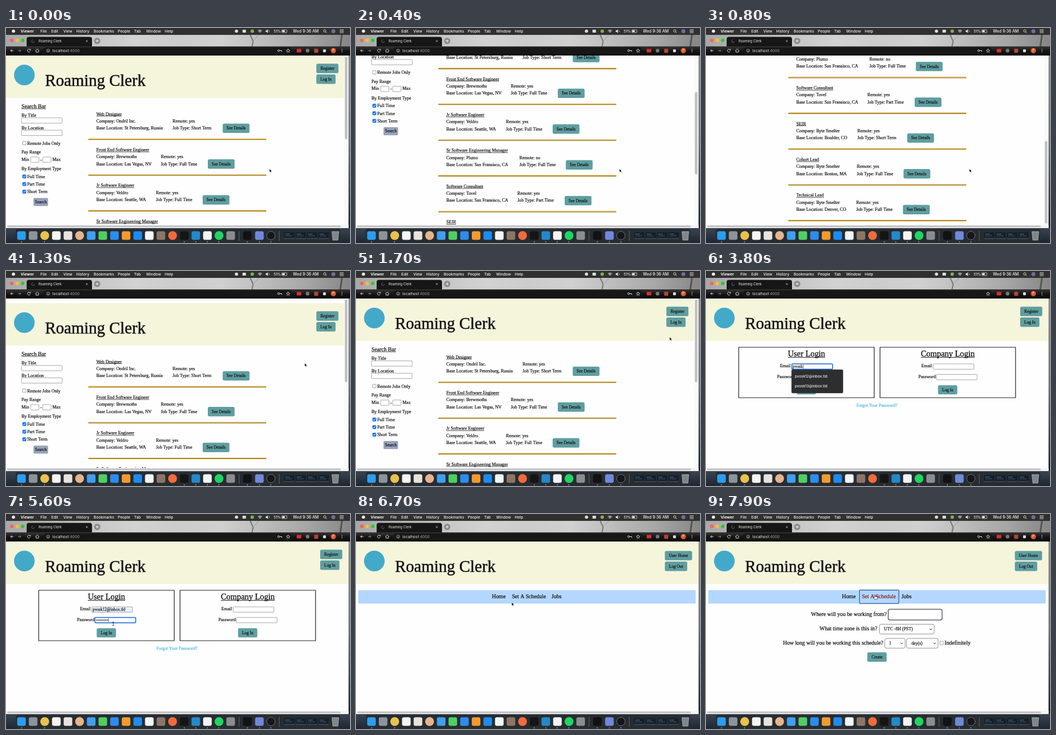
These frames come from a looping animation (600x375 px, 8 s). An HTML page with a canvas:

```html
<!DOCTYPE html>
<html lang="en">
<head>
<meta charset="utf-8">
<title>Roaming Clerk</title>
<style>
html, body { margin: 0; height: 100%; overflow: hidden; background: #fff; }
canvas { display: block; width: 600px; height: 375px; }
</style>
</head>
<body>
<canvas id="stage"></canvas>
<script>
const canvas = document.getElementById('stage');
const c = canvas.getContext('2d');
const dpr = window.devicePixelRatio || 1;
canvas.width = 600 * dpr;
canvas.height = 375 * dpr;

const SERIF = '"Liberation Serif", serif';
const SANS = 'Inter, Roboto, sans-serif';
const INK = '#111', TEAL = '#5f9ea0', SITE = 'Roaming Clerk';
const EMAILS = ['pvosk12@inbox.tld', 'pvosk13@inbox.tld'];

// title, company, location, remote, type, second column x, button x
const jobs = [
  ['Web Designer', 'Ondril Inc.', 'St Petersburg, Russia', 'yes', 'Short Term', 290.5, 378],
  ['Front End Software Engineer', 'Brewmoths', 'Las Vegas, NV', 'yes', 'Full Time', 270, 352],
  ['Jr Software Engineer', 'Veldro', 'Seattle, WA', 'yes', 'Full Time', 261.5, 343],
  ['Sr Software Engineering Manager', 'Plumo', 'San Fransisco, CA', 'no', 'Full Time', 285, 366],
  ['Software Consultant', 'Tovel', 'San Fransisco, CA', 'yes', 'Part Time', 281.5, 364],
  ['SEIR', 'Byte Smelter', 'Boulder, CO', 'yes', 'Short Term', 264, 351],
  ['Cohort Lead', 'Byte Smelter', 'Boston, MA', 'yes', 'Full Time', 263, 344.5],
  ['Technical Lead', 'Byte Smelter', 'Denver, CO', 'yes', 'Full Time', 262, 343.5]
];

const scrollKeys = [[0, 0], [100, 12], [800, 295], [950, 295], [1200, 0], [1300, -8], [1500, 0]];
const mouseKeys = [
  [0, 459.5, 245.5], [950, 459.5, 245.5], [1300, 521, 160.5], [1700, 547, 115], [2000, 560, 88],
  [2700, 560, 88], [3200, 166, 166], [5400, 187, 191], [5600, 187, 191], [5900, 177, 206],
  [6200, 177, 206], [6900, 295, 141], [8000, 295, 141]
];

function track(keys, t, i = 1) {
  const n = keys.findIndex(k => k[0] > t);
  if (n < 0) return keys[keys.length - 1][i];
  if (n === 0) return keys[0][i];
  const a = keys[n - 1], b = keys[n];
  let p = (t - a[0]) / (b[0] - a[0]);
  p *= p * (3 - 2 * p);
  return a[i] + (b[i] - a[i]) * p;
}

function rect(x, y, w, h, fill, r = 0, line, lw = 1) {
  c.beginPath();
  c.roundRect(x, y, w, h, r);
  if (fill) { c.fillStyle = fill; c.fill(); }
  if (line) { c.strokeStyle = line; c.lineWidth = lw; c.stroke(); }
}
function disc(x, y, r, fill) {
  c.beginPath();
  c.arc(x, y, r, 0, 7);
  c.fillStyle = fill;
  c.fill();
}
function path(points, color, lw = 1, fill) {
  c.beginPath();
  for (let i = 0; i < points.length; i += 2) c.lineTo(points[i], points[i + 1]);
  if (fill) { c.closePath(); c.fillStyle = fill; c.fill(); }
  c.strokeStyle = color;
  c.lineWidth = lw;
  c.stroke();
}
function arc(x, y, r, from, to, color, lw = 1) {
  c.beginPath();
  c.arc(x, y, r, from, to);
  c.strokeStyle = color;
  c.lineWidth = lw;
  c.stroke();
}
// y is the middle of the capitals; serif text gets a hairline outline for weight
function text(s, x, y, size = 7.85, o = {}) {
  c.font = `${o.weight || 400} ${size}px ${o.font || SERIF}`;
  c.textAlign = o.align || 'left';
  c.fillStyle = o.color || INK;
  const base = y + size * 0.33, w = c.measureText(s).width;
  c.fillText(s, x, base);
  if (!o.font) {
    c.strokeStyle = c.fillStyle;
    c.lineWidth = 0.1 + size * 0.013;
    c.strokeText(s, x, base);
  }
  if (o.under) c.fillRect(o.align ? x - w / 2 : x, base + size * 0.1, w, Math.max(0.7, size / 15));
  return w;
}
function button(s, x, y, w, h) {
  rect(x, y, w, h, TEAL, 2.5);
  text(s, x + w / 2, y + h / 2, 7.3, { align: 'center' });
}
function field(x, y, w = 71, focus, fill = '#fff') {
  rect(x, y, w, 9.3, fill, 1, focus ? '#1667d9' : '#858585', focus ? 1.5 : 0.7);
}
function check(x, y, on) {
  rect(x - 3, y - 3, 6, 6, on ? '#1a73e8' : '#fff', 1, on ? '#1a73e8' : '#767676', 0.7);
  if (on) path([x - 1.8, y, x - 0.5, y + 1.5, x + 2, y - 1.6], '#fff', 1);
}
function gradient(x0, y0, x1, y1, colors) {
  const g = c.createLinearGradient(x0, y0, x1, y1);
  colors.forEach((v, i) => g.addColorStop(i / (colors.length - 1), v));
  return g;
}

function menuBar() {
  rect(0, 0, 600, 12, '#303031');
  disc(13, 5.5, 2.8, '#eee');
  const o = { font: SANS, color: '#f4f4f4', weight: 500 };
  text('Viewer', 25.5, 5.5, 6.8, { ...o, weight: 700 });
  [['File', 60], ['Edit', 79], ['View', 100], ['History', 122.5], ['Bookmarks', 153], ['People', 195],
    ['Tab', 223.5], ['Window', 244.5], ['Help', 277]].forEach(([s, x]) => text(s, x, 5.5, 6.6, o));
  disc(402, 5.5, 2.8, '#ddd');
  rect(412.5, 3, 6, 5, '#ddd');
  disc(429.5, 5.5, 3, '#7fb04f');
  [1.5, 3.2, 5].forEach(r => arc(443, 8.5, r, 3.9, 5.5, '#eee', 1));
  path([453, 4.5, 454.5, 4.5, 456.5, 2.5, 456.5, 8.5, 454.5, 6.5, 453, 6.5], '#eee', 0.3, '#eee');
  arc(457, 5.5, 2.3, -0.9, 0.9, '#eee', 0.7);
  text('51%', 467, 5.5, 6.2, o);
  rect(481, 3, 9, 5, null, 1, '#eee', 0.7);
  rect(482, 4, 4.2, 3, '#eee');
  text('Wed 9:36 AM', 500.5, 5.5, 6.9, o);
  arc(556, 5, 2.1, 0, 7, '#eee', 0.8);
  path([557.5, 6.5, 559.3, 8.5], '#eee', 0.9);
  disc(571, 5.5, 3.5, '#6b6f9a');
  [3, 5.5, 8].forEach(y => path([582, y, 589, y], '#eee', 0.9));
}

function browserBar(key) {
  rect(0, 12, 600, 21, gradient(0, 0, 600, 0,
    ['#a8a8a8', '#b4b4b4', '#c6c6c6', '#d2d2d2', '#cccccc', '#d0d0d0', '#bcbcbc', '#a6a6a6', '#868686']));
  path([426, 12, 431, 23, 429, 33], '#777', 2);
  path([431, 23, 441, 12], '#999', 1);
  path([586, 12, 583, 33], '#555', 3);
  ['#ff5f57', '#febc2e', '#28c840'].forEach((v, i) => disc(10 + i * 9.6, 21.5, 3.1, v));
  rect(36, 15.5, 114, 18, '#161616', [4, 4, 0, 0]);
  arc(47, 23, 2.4, 0, 4.7, '#777', 0.8);
  text(SITE, 57, 22.7, 5.8, { font: SANS, color: '#eee' });
  path([139.5, 21.3, 142.5, 24.3], '#ccc', 0.8);
  path([142.5, 21.3, 139.5, 24.3], '#ccc', 0.8);
  disc(159, 22.5, 5.5, '#8d8d8d');
  path([156.5, 22.5, 161.5, 22.5], '#fff', 0.9);
  path([159, 20, 159, 25], '#fff', 0.9);

  rect(0, 32, 600, 16, gradient(0, 32, 0, 48, ['#363636', '#161616', '#080808']));
  rect(64, 33.8, 435, 11.5, '#171717', 6);
  const w = '#dedede';
  path([13, 39.5, 8, 39.5, 10.3, 37.2], w, 0.9);
  path([8, 39.5, 10.3, 41.8], w, 0.9);
  path([21, 39.5, 26, 39.5, 23.7, 37.2], '#888', 0.9);
  path([26, 39.5, 23.7, 41.8], '#888', 0.9);
  arc(40, 39.5, 2.6, 0.5, 5.8, w, 0.9);
  path([40.8, 38.3, 42.8, 38.5, 42.8, 36.5], w, 0.8);
  path([51.2, 39.5, 54.5, 36.5, 57.8, 39.5], w, 0.9);
  path([52.3, 39, 52.3, 42.2, 56.7, 42.2, 56.7, 39], w, 0.9);
  arc(73.5, 39.5, 2.6, 0, 7, w, 0.7);
  path([73.5, 39, 73.5, 41], w, 0.8);
  const n = text('localhost', 81, 39.5, 6.7, { font: SANS, color: '#f0f0f0' });
  text(':4000', 81 + n, 39.5, 6.7, { font: SANS, color: '#a0a0a0' });
  if (key) {
    arc(475.5, 39.5, 1.6, 0, 7, w, 1);
    path([477, 39.5, 481, 39.5, 481, 41.3], w, 1);
  }
  const star = [];
  for (let i = 0; i < 11; i++) {
    const r = i % 2 ? 1.4 : 3.4, a = i * Math.PI / 5;
    star.push(492 + r * Math.sin(a), 39.7 - r * Math.cos(a));
  }
  path(star, w, 0.7);
  rect(507, 36.5, 8, 6, '#df2d2d', 1);
  disc(526, 39.5, 3.2, '#777');
  rect(537.5, 36.3, 7, 7, '#b84436', 1);
  rect(553, 37.2, 5, 5, '#ddd', 1);
  disc(571, 39.5, 4.6, '#e2552b');
  text('P', 571, 39.5, 5.5, { font: SANS, color: '#fff', align: 'center' });
  [37.2, 39.5, 41.8].forEach(y => disc(586, y, 0.7, w));
}

function dock() {
  rect(597.5, 48, 2.5, 301, gradient(0, 48, 0, 349, ['#8a8a8a', '#6d7073', '#111d2b']));
  rect(0, 343.5, 597.5, 5.5, '#f4f4f4');
  rect(2, 344.5, 582, 3, '#c1c1c1', 1.5);
  rect(0, 349, 600, 26, gradient(0, 349, 0, 375, ['#3a4550', '#1c2733']));
  rect(17, 350.5, 566, 26, '#272c31', [4, 4, 0, 0]);
  const square = (x, v) => rect(x - 7.5, 354.5, 15, 15, v, 3.2);
  ['#2c9df0', '#8c949b', '#e9c24b', '#f5f5f5', '#e8e3dc', '#e6b48c', '#3f9ff0', '#4fcf62', '#2d8cf0', '#f29a2e',
    '#1d8cf0', '#f5f7f5', '#8c7767', '#f26b3a', '#151515', '#2489ca', '#f4f4f4', '#1ed760', '#8b8d90']
    .forEach((v, i) => [2, 5, 13, 17].includes(i) ? disc(27 + i * 20.27, 362, 7.7, v) : square(27 + i * 20.27, v));
  path([406.5, 354, 406.5, 371], '#70777d', 0.7);
  square(421, '#101214');
  square(442, '#7289da');
  disc(462, 362, 7.5, '#15171a');
  arc(462, 362, 7.3, 0, 7, '#aaa', 0.6);
  path([476.5, 354, 476.5, 371], '#70777d', 0.7);
  [485, 505, 525, 545].forEach(x => {
    rect(x, 356.5, 18, 12, '#13202d');
    rect(x + 2, 359, 8, 1, '#597087');
    rect(x + 2, 362, 12, 1, '#415a70');
    rect(x, 366, 18, 2.5, '#3b4045');
  });
  path([568.5, 355, 580.5, 355, 579, 370, 570, 370], '#b8bec3', 0.7, '#7f878d');
  [27, 67, 311, 331, 351, 371, 421, 442, 462].forEach(x => disc(x, 373, 0.8, '#ddd'));
}

function header(buttons, right, top = 62.3) {
  rect(0, 48, 600, 74, '#f5f5dc');
  disc(32, 82, 18, '#43a9c9');
  text(SITE, 68, 91.3, 28.6);
  buttons.forEach(([s, w], i) => button(s, right, top + i * 18.7, w, 16.4));
}

function jobList(scroll) {
  c.save();
  c.translate(0, -scroll);
  header([['Register', 38.5], ['Log In', 33.5]], 541.3);
  text('Search Bar', 27, 136.5, 9.7, { under: true });
  text('By Title', 27, 152.5);
  field(27, 156.7);
  text('By Location', 27, 174);
  field(27, 178.3);
  check(32, 200.7);
  text('Remote Jobs Only', 37, 201);
  text('Pay Range', 27, 216.7);
  text('Min', 27, 229);
  field(43, 225, 14.5);
  text('-', 59.7, 229);
  field(64, 225, 14.5);
  text('Max', 81, 229);
  text('By Employment Type', 27, 245.7);
  ['Full Time', 'Part Time', 'Short Term'].forEach((s, i) => {
    check(32, 259 + i * 13.2, true);
    text(s, 37, 259.2 + i * 13.2);
  });
  rect(48.5, 297, 24.3, 13, '#98a4bd', 1, '#8490a8', 0.8);
  text('Search', 60.7, 303.3, 7.5, { align: 'center' });

  jobs.forEach(([title, firm, place, remote, type, x, bx], i) => {
    const y = 150 + i * 62.4;
    text(title, 157.5, y, 7.85, { under: true });
    text('Company: ' + firm, 157.5, y + 12.3);
    text('Base Location: ' + place, 157.5, y + 24.6);
    text('Remote: ' + remote, x, y + 12.3);
    text('Job Type: ' + type, x, y + 24.6);
    button('See Details', bx, y + 16.7, 46.7, 16.4);
    rect(143.5, y + 43, 310.5, 1.2, '#cb9a22');
    rect(143.5, y + 44.2, 310.5, 1.1, '#9c730f');
  });
  c.restore();
  rect(589.5, 48, 10.5, 296, '#fafafa');
  const s = Math.max(0, Math.min(295, scroll));
  rect(591, 50 + s / 295 * 147, 4.5, 144, '#c1c1c1', 2.2);
}

function login(t) {
  header([['Register', 38.5], ['Log In', 33.5]], 548);
  const chosen = t >= 4000, closed = t >= 4300;
  const inEmail = t >= 3100 && t < 4500, inPass = t >= 4500;
  const typed = [3200, 3300, 3500, 3600, 3800].filter(k => t >= k).length;

  [[57, 'User'], [303.5, 'Company']].forEach(([x, s], i) => {
    const mid = x + 118.2;
    rect(x, 133, 236.4, 88, null, 0, '#222', 1.2);
    text(s + ' Login', mid, 144, 14.4, { align: 'center', under: true });
    text('Email', x + 72, 165.7);
    field(x + 92.7, 162, 71, !i && inEmail, !i && chosen ? '#e8f0fe' : '#fff');
    text('Password', x + 67, 184.3);
    field(x + 98.3, 180.4, 71, !i && inPass);
    button('Log In', mid - 17, 199.2, 33.6, 16);
  });
  text('Forgot Your Password?', 298, 234, 7.65, { align: 'center', color: '#4db8e8' });

  const w = text(chosen ? EMAILS[0] : EMAILS[0].slice(0, typed), 151.3, 166.3, 7.2);
  if (inEmail) rect(151.8 + w, 163.3, 0.6, 6.6, INK);
  if (inPass) {
    const n = Math.min(8, Math.floor((t - 4500) / 100));
    for (let i = 0; i < n; i++) disc(158.5 + i * 2.6, 185, 0.9, INK);
    rect(157.8 + n * 2.6, 182, 0.6, 6.4, INK);
  }
  if (t >= 3200 && !closed) {
    rect(149.2, 172, 89.8, 41, '#2d2e30', 2, '#44474a', 0.4);
    if (chosen) rect(149.2, 176, 89.8, 16, '#48494c');
    EMAILS.forEach((s, i) => text(s, 155, 184 + i * 17, 6.3, { font: SANS, color: '#f0f0f0', weight: 500 }));
  }
}

function select(s, x, y, w, pad) {
  rect(x, y, w, 17, '#fff', 3, '#777', 0.8);
  text(s, x + pad, y + 8.4, 7.8);
  path([x + w - 8, y + 7.5, x + w - 6, y + 9.7, x + w - 4, y + 7.5], '#222', 1);
}

function userHome(t) {
  header([['User Home', 47.5], ['Log Out', 39]], 538.7, 64.4);
  rect(4, 132.7, 588.5, 23.5, '#b3d7ff');
  const open = t >= 7500, hover = t >= 6900;
  if (open) rect(267.7, 132.7, 68.6, 23.4, null, 1, '#2a5ba8', 1.2);
  text('Home', 237, 144, 9.9);
  text('Set A Schedule', 272, 144, 9.6, { color: hover ? '#8a1a1c' : INK });
  text('Jobs', 341, 144, 9.9);
  if (!open) return;
  text('Where will you be working from?', 183.3, 174.5, 9.68);
  rect(317.8, 166.2, 94, 18.6, '#fff', 3, '#4a4a52', 1.3);
  text('What time zone is this in?', 198, 200.3, 9.68);
  select('UTC -8H (PST)', 302.5, 192.3, 95.5, 8);
  text('How long will you be working this schedule?', 134.3, 225, 9.65);
  select('1', 311.8, 217, 35.5, 7.5);
  select('day(s)', 349.7, 217, 55, 8.5);
  check(411, 225);
  text('Indefinitely', 416, 225, 9.75);
  button('Create', 281.3, 241.3, 33.7, 16.4);
}

function pointer(t) {
  if (t >= 3300 && t < 5400) return;
  const x = track(mouseKeys, t), y = track(mouseKeys, t, 2);
  c.save();
  c.translate(x, y);
  if ((t >= 3100 && t < 3300) || (t >= 5400 && t < 5800)) {
    path([-1.5, -3, 0, -2.3, 0, 3.3, -1.5, 4], '#222', 0.8);
    path([1.5, -3, 0, -2.3], '#222', 0.8);
    path([0, 3.3, 1.5, 4], '#222', 0.8);
  } else if ((t >= 1900 && t < 2400) || (t >= 5800 && t < 6100) || t >= 6900) {
    path([-1, 0, 0.2, 0, 0.4, 3, 4, 3.5, 4, 6.3, 3, 8, -0.8, 8, -3, 4.5, -2, 4, -1, 5], '#222', 0.7, '#fff');
  } else {
    path([0, 0, 0, 6, 1.4, 4.9, 2.4, 7, 3.4, 6.5, 2.4, 4.5, 4.2, 4.4], '#fff', 0.5, '#000');
  }
  c.restore();
}

function draw(now) {
  const t = Math.floor(now % 8000 / 100) * 100;
  c.setTransform(dpr, 0, 0, dpr, 0, 0);
  c.lineJoin = 'round';
  rect(0, 0, 600, 375, '#fefefe');
  if (t < 2200) jobList(track(scrollKeys, t));
  else if (t < 6000) login(t);
  else userHome(t);
  browserBar(t < 3100 || t >= 4500);
  menuBar();
  dock();
  pointer(t);
}

const start = performance.now();
function loop() {
  draw(performance.now() - start);
  requestAnimationFrame(loop);
}
loop();
</script>
</body>
</html>
```
